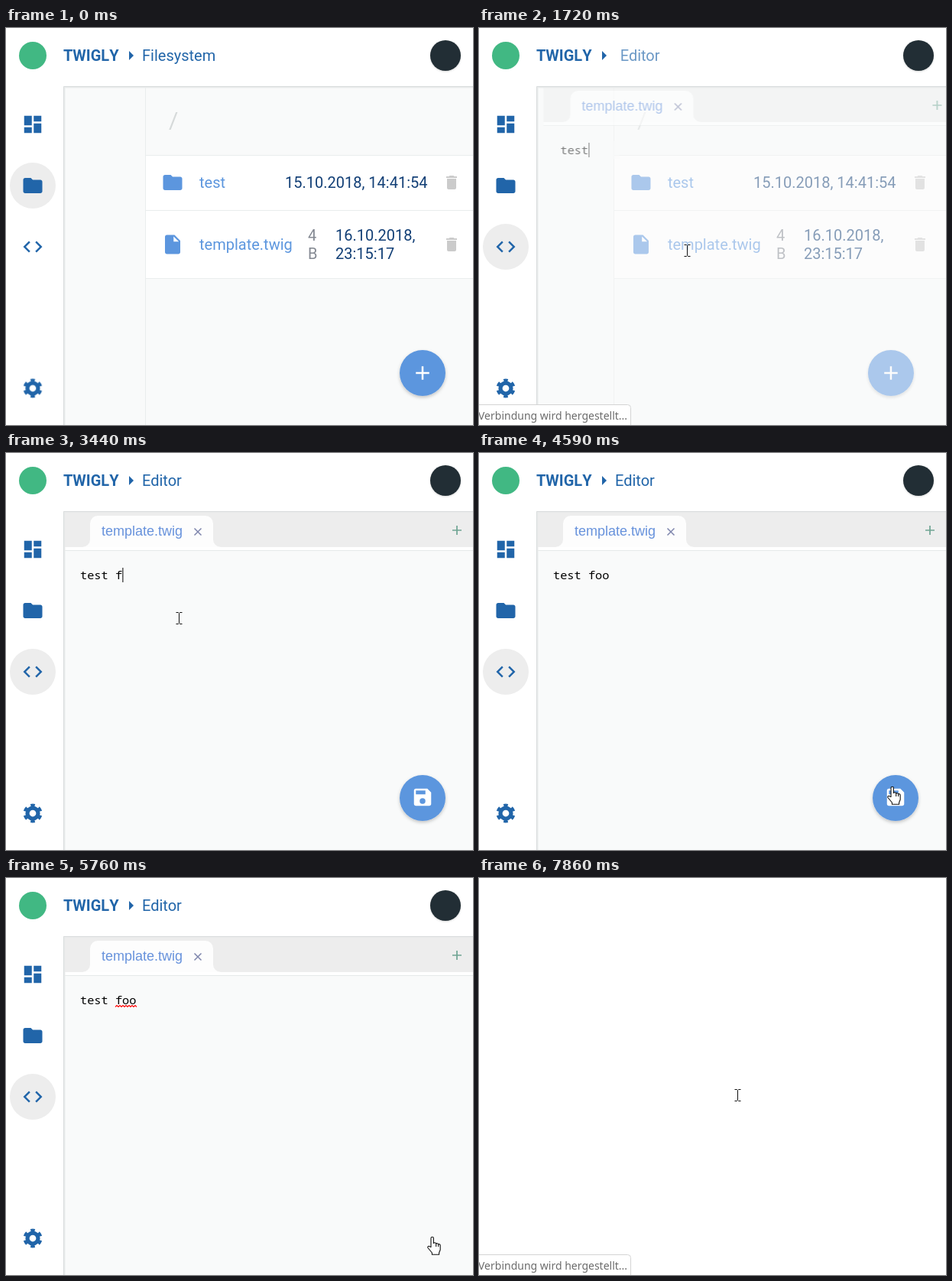
Animation of 611x519 px, one loop 8 s. Source, as an HTML page:

```html
<!DOCTYPE html>
<html lang="de">
<head>
<meta charset="utf-8">
<title>Template editor</title>
<style>
html, body { margin: 0; width: 100%; height: 100%; overflow: hidden; background: #fff; }
svg.stage { display: block; width: 611px; height: 519px; font: 20px Roboto, sans-serif; }
text { white-space: pre; }
.brand { font-weight: 700; font-kerning: none; }
.blue { fill: #2165a9; }
.light { fill: #5c96de; }
.navy { fill: #123f76; }
.grey { fill: #858a93; }
.trash { fill: #cbcbcb; }
.line { fill: #e9eded; }
.code { font: 15.3px "Noto Sans Mono", monospace; }

/* One loop lasts 8 s: 1% is 80 ms. */
.step { animation: 8s step-end infinite; }
.move { animation: 8s ease-in-out infinite; }

#files { animation-name: files; }
@keyframes files {
  0%, 18.5% { opacity: 1; transform: none; }
  24.5%, 100% { opacity: 0; transform: translateX(-12px); }
}
#editor { animation-name: editor; }
@keyframes editor {
  0%, 18.5% { opacity: 0; transform: translateX(19px); }
  24.5%, 100% { opacity: 1; transform: none; }
}
#title { animation-name: title; }
@keyframes title {
  0%, 19% { opacity: 0; transform: translateX(20px); }
  23.2%, 100% { opacity: 1; transform: none; }
}
#save { animation-name: save; transform-origin: 545px 451px; }
@keyframes save {
  0%, 39% { opacity: 0; transform: scale(0); }
  43%, 69% { opacity: 1; transform: none; }
  72%, 100% { opacity: 0; transform: scale(0); }
}
.before { animation-name: before; }
@keyframes before { 0% { visibility: visible } 19.3%, 100% { visibility: hidden } }
.after { animation-name: after; }
@keyframes after { 0% { visibility: hidden } 19.3%, 100% { visibility: visible } }
#hover { animation-name: hover; }
@keyframes hover { 0%, 19%, 100% { visibility: hidden } 8.7% { visibility: visible } }
#typing { animation-name: typing; }
@keyframes typing {
  0% { transform: none; }
  39% { transform: translateX(9.2px); }
  41.5% { transform: translateX(18.4px); }
  43.9% { transform: translateX(27.6px); }
  45.9%, 100% { transform: translateX(36.7px); }
}
#caret { animation-name: caret; }
@keyframes caret {
  0%, 32.1%, 58.9%, 79.75% { visibility: visible }
  26.4%, 52.75%, 65.1%, 86.6%, 100% { visibility: hidden }
}
#squiggle { animation-name: squiggle; }
@keyframes squiggle { 0% { visibility: hidden } 59%, 100% { visibility: visible } }
#status { animation-name: status; }
@keyframes status {
  0%, 26.3% { visibility: hidden }
  20.5%, 91.375%, 100% { visibility: visible }
}
#blank { animation-name: blank; }
@keyframes blank { 0% { visibility: hidden } 98.25%, 100% { visibility: visible } }

#pointer { animation-name: pointer; }
@keyframes pointer {
  0%, 1.2% { transform: translate(500px, 522px); }
  10.75%, 29% { transform: translate(270px, 290px); }
  32.1%, 52.2% { transform: translate(224px, 215px); }
  57.37% { transform: translate(540px, 436px); }
  60.5% { transform: translate(570px, 474px); }
  62.6% { transform: translate(559px, 471px); }
  63.25%, 75.5% { transform: translate(557px, 469px); }
  77.9%, 100% { transform: translate(336px, 283px); }
}
#arrow { animation-name: arrow; }
@keyframes arrow { 0% { visibility: visible } 8.7%, 100% { visibility: hidden } }
#hand { animation-name: hand; }
@keyframes hand {
  0%, 19.5%, 73%, 100% { visibility: hidden }
  8.7%, 56% { visibility: visible }
}
#beam { animation-name: beam; }
@keyframes beam {
  0%, 56% { visibility: hidden }
  19.5%, 73%, 100% { visibility: visible }
}
#click { animation-name: click; }
@keyframes click {
  0%, 18.5%, 69%, 82.75%, 100% { visibility: hidden }
  15.5%, 65.1%, 79.75% { visibility: visible }
}
</style>
</head>
<body>
<svg class="stage" viewBox="0 0 611 519">
  <defs>
    <symbol id="i-dashboard" viewBox="0 0 24 24"><path d="M3 13h8V3H3zm0 8h8v-6H3zm10 0h8V11h-8zm0-18v6h8V3z"/></symbol>
    <symbol id="i-folder" viewBox="0 0 24 24"><path d="M10 4H4c-1.1 0-2 .9-2 2v12c0 1.1.9 2 2 2h16c1.1 0 2-.9 2-2V8c0-1.1-.9-2-2-2h-8z"/></symbol>
    <symbol id="i-code" viewBox="0 0 24 24"><path d="M9.4 16.6 4.8 12l4.6-4.6L8 6l-6 6 6 6zm5.2 0 4.6-4.6-4.6-4.6L16 6l6 6-6 6z"/></symbol>
    <symbol id="i-gear" viewBox="0 0 24 24">
      <g fill="none" stroke="#2165a9">
        <circle cx="12" cy="12" r="5.6" stroke-width="4.2"/>
        <circle cx="12" cy="12" r="8.6" stroke-width="2.8" pathLength="12" stroke-dasharray="1" stroke-dashoffset="-.5"/>
      </g>
    </symbol>
    <symbol id="i-file" viewBox="0 0 24 24"><path d="M6 2c-1.1 0-2 .9-2 2v16c0 1.1.9 2 2 2h12c1.1 0 2-.9 2-2V8l-6-6zm7 7V3.5L18.5 9z"/></symbol>
    <symbol id="i-trash" viewBox="0 0 24 24"><path d="M6 19c0 1.1.9 2 2 2h8c1.1 0 2-.9 2-2V7H6zM19 4h-3.5l-1-1h-5l-1 1H5v2h14z"/></symbol>
    <symbol id="i-plus" viewBox="0 0 24 24"><path d="M19 13h-6v6h-2v-6H5v-2h6V5h2v6h6z"/></symbol>
    <symbol id="i-save" viewBox="0 0 24 24"><path d="M17 3H5c-1.1 0-2 .9-2 2v14c0 1.1.9 2 2 2h14c1.1 0 2-.9 2-2V7zm-5 16a3 3 0 1 1 0-6 3 3 0 0 1 0 6zm3-10H5V5h10z"/></symbol>
    <filter id="shadow" x="-30%" y="-30%" width="160%" height="160%">
      <feDropShadow dx="0" dy="2" stdDeviation="2" flood-opacity=".22"/>
    </filter>
    <filter id="soft" x="-30%" y="-30%" width="160%" height="160%">
      <feDropShadow dx="0" dy="1" stdDeviation="1" flood-opacity=".16"/>
    </filter>
    <g id="button"><circle class="light" cx="545" cy="451" r="30" filter="url(#shadow)"/></g>
  </defs>

  <rect x="75" y="76" width="536" height="443" fill="#f9fafa"/>

  <g id="files" class="move">
    <rect class="line" x="182" y="76" width="1" height="443"/>
    <rect class="line" x="183" y="166" width="440" height="162"/>
    <rect x="183" y="167" width="440" height="71" fill="#fff"/>
    <rect x="183" y="239" width="440" height="88" fill="#fff"/>
    <rect id="hover" class="step" x="183" y="238" width="440" height="90" fill="#ededed"/>
    <text x="213" y="131" font-size="30" fill="#d6dada">/</text>
    <g class="light">
      <use href="#i-folder" x="203" y="187" width="30" height="30"/>
      <use href="#i-file" x="203" y="268" width="30" height="30"/>
      <text x="253" y="209">test</text>
      <text x="253" y="290">template.twig</text>
    </g>
    <g class="grey"><text x="395" y="278">4</text><text x="395" y="302">B</text></g>
    <g class="navy">
      <text x="365" y="209">15.10.2018, 14:41:54</text>
      <text x="431" y="278">16.10.2018,</text>
      <text x="431" y="302">23:15:17</text>
    </g>
    <g class="trash">
      <use href="#i-trash" x="571" y="190" width="24" height="24"/>
      <use href="#i-trash" x="571" y="271" width="24" height="24"/>
    </g>
    <use href="#button"/>
    <use href="#i-plus" x="530" y="436" width="30" height="30" fill="#fff"/>
  </g>

  <g id="editor" class="move">
    <rect x="75" y="76" width="536" height="47" fill="#ededed"/>
    <rect x="75" y="123" width="536" height="4" fill="#fff"/>
    <rect x="75" y="127" width="536" height="1" fill="#e6e9e9"/>
    <path d="M100 123a10 10 0 0 0 10-10V92a10 10 0 0 1 10-10H261a10 10 0 0 1 10 10v21a10 10 0 0 0 10 10z" fill="#fdfdfd"/>
    <text x="125" y="108" font-size="18" font-family="Liberation Sans, Arial, sans-serif" fill="#6792dc">template.twig</text>
    <path d="M246.5 98.500l9 9m0-9l-9 9" stroke="#7f86ad" stroke-width="1.5"/>
    <path d="M584 101h12m-6-6v12" stroke="#6fa493" stroke-width="1.7"/>
    <text class="code" x="97" y="165">test foo</text>
    <g id="typing" class="step">
      <rect x="134" y="148" width="40" height="23" fill="#f9fafa"/>
      <rect id="caret" class="step" x="134" y="150" width="1" height="19"/>
    </g>
    <path id="squiggle" class="step" d="M143 168.500l2-2 2 2 2-2 2 2 2-2 2 2 2-2 2 2 2-2 2 2 2-2 2 2 2-2 2 2" fill="none" stroke="#f00" stroke-width="1.1"/>
  </g>
  <g id="save" class="move">
    <use href="#button"/>
    <use href="#i-save" x="530" y="435" width="30" height="30" fill="#fff"/>
  </g>

  <path d="M0 0H611V76H75V519H0z" fill="#fff"/>
  <path d="M611 77.500H76.500V519" fill="none" stroke="#e9ebeb" stroke-width="2"/>
  <path d="M611 76.500H75.500V519" fill="none" stroke="#d9dcdd"/>
  <circle cx="35" cy="36" r="18" fill="#41b883"/>
  <circle cx="575" cy="36" r="20" fill="#242f35" filter="url(#soft)"/>

  <g class="blue">
    <text class="brand" x="75" y="43">TWIGLY</text>
    <path d="M161 30l6 6-6 6z"/>
    <text class="step before" x="178" y="43">Filesystem</text>
    <text id="title" class="move" x="178" y="43">Editor</text>
  </g>
  <circle class="step before" cx="35" cy="206" r="30" fill="#ededed"/>
  <circle class="step after" cx="35" cy="286" r="30" fill="#ededed"/>
  <g class="blue">
    <use href="#i-dashboard" x="20" y="111" width="30" height="30"/>
    <use href="#i-folder" x="20" y="191" width="30" height="30"/>
    <use href="#i-code" x="20" y="271" width="30" height="30"/>
    <use href="#i-gear" x="20" y="456" width="30" height="30"/>
  </g>

  <rect id="blank" class="step" width="611" height="519" fill="#fff"/>

  <g id="status" class="step">
    <path d="M-1 492.500H194.500q4 0 4 4V520H-1z" fill="#fff" stroke="#d4d4d4"/>
    <text x="-1" y="512" font-size="14" font-family="Noto Sans, sans-serif" fill="#6c6c6c">Verbindung wird hergestellt...</text>
  </g>

  <g id="pointer" class="move">
    <circle id="click" class="step" r="15" fill="#f4ef3c" fill-opacity=".75"/>
    <path id="arrow" class="step" d="M0 0v17l4-4 2.7 6.2 2.6-1.1-2.7-6H12z" fill="#fff" stroke="#000"/>
    <path id="hand" class="step" d="M-1 13.500V2a1.700 1.700 0 0 1 3.400 0v6.500c.5-1 3-1 3.200.6.600-.8 2.800-.6 3 .8.800-.6 2.600-.2 2.600 1.600V17l-1.600 4v2.300H.4V21L-5 14.500c-.8-2 1.400-3 2.600-1.500zM5.700 9v4M8.700 10v3" fill="#fff" stroke="#111" stroke-width="1.1" stroke-linejoin="round"/>
    <path id="beam" class="step" d="M-1.500-6.500h3l1 1 1-1h3M2.500-5.500v13M-1.500 8.500h3l1-1 1 1h3" fill="none" stroke="#111"/>
  </g>
</svg>
</body>
</html>
```
